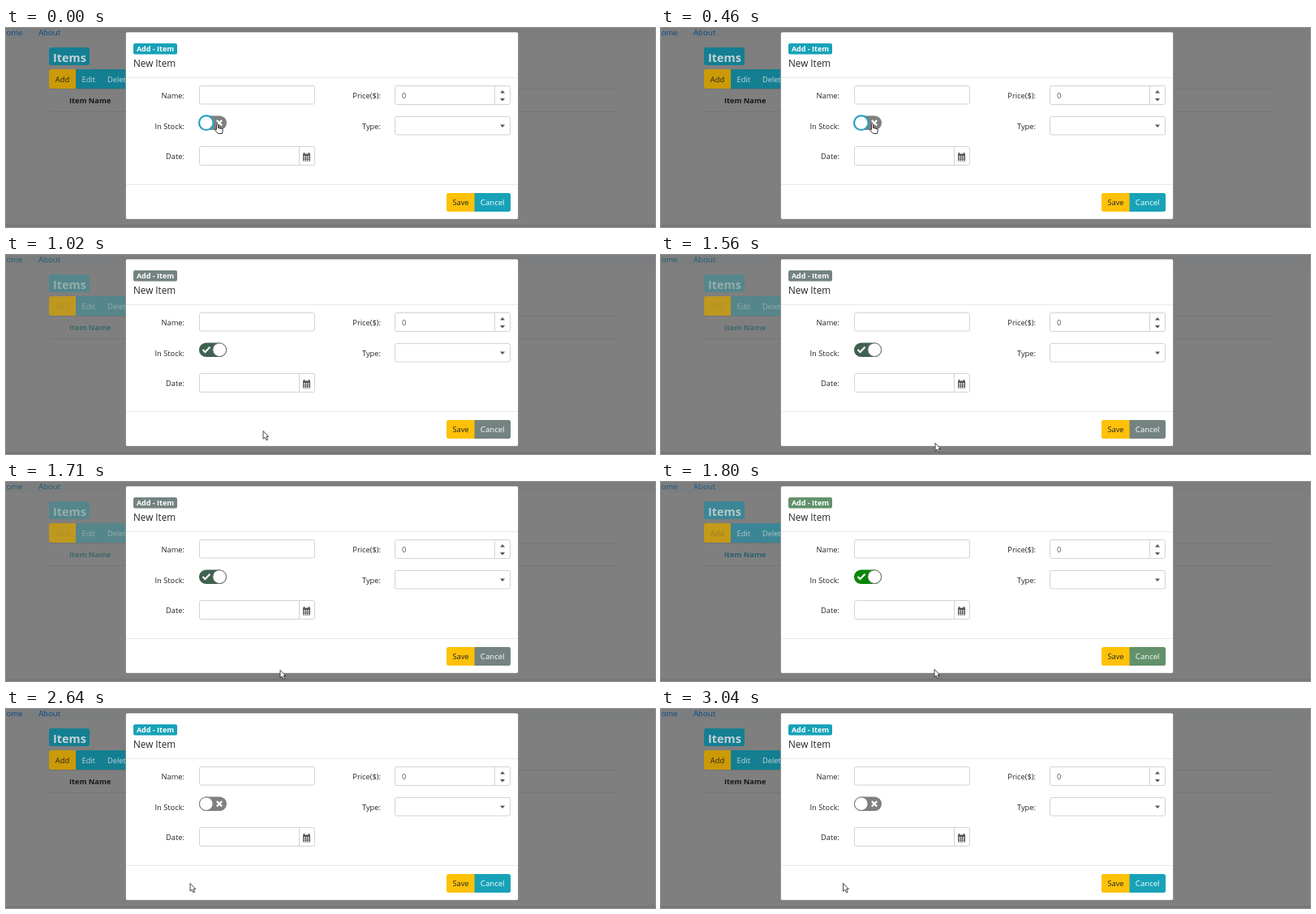
These frames come from a looping animation (800 by 246 pixels, 3250 ms). An HTML page:

```html
<!DOCTYPE html>
<html lang="en">
<head>
<meta charset="utf-8">
<title>Add item dialog</title>
<style>
  html, body { margin: 0; width: 100%; height: 100%; overflow: hidden; background: #7f7f7f; }
  svg { display: block; }
  text { font: 9.3px "Open Sans", "Noto Sans", sans-serif; fill: #212529; }
  .bold { font-weight: 700; }
  .link { font-size: 9.6px; fill: var(--link); }
  .field { fill: #fff; stroke: #ced4da; }
  .line { stroke: #e6e9ec; }
  .dim { stroke: #717476; }
  .icon { fill: #555; }
  .accent { fill: var(--accent); }
  .page { fill: var(--page); }
  .pageText { fill: var(--pageText); }
  .white { fill: #fff; }
  .end { text-anchor: end; }
  .mid { text-anchor: middle; }
</style>
</head>
<body>
<svg id="stage" width="800" height="246" viewBox="0 0 800 246">
  <!-- dimmed page -->
  <rect width="800" height="246" fill="#7f7f7f"/>
  <rect width="800" height="13" fill="#7c7d7e"/>
  <path class="dim" d="M53 75.5H755M53 103.5H755"/>
  <rect y="243" width="800" height="3" fill="#777"/>
  <text class="link end" x="20.5" y="9">Home</text>
  <text class="link" x="40" y="9">About</text>
  <rect class="page" x="53" y="24" width="50" height="22" rx="3"/>
  <text class="bold pageText" x="58" y="41.5" style="font-size:14.4px">Items</text>
  <rect class="page" x="80" y="51" width="80" height="24"/>
  <path d="M86 51H56a3 3 0 0 0-3 3V72a3 3 0 0 0 3 3H86Z" fill="var(--add)"/>
  <text class="mid" x="69.5" y="66.5" style="fill:var(--addText)">Add</text>
  <text class="pageText" x="93.5" y="66.5">Edit</text>
  <text class="pageText" x="125" y="66.5">Delete</text>
  <text class="bold" x="78" y="93" style="font-size:9.2px;fill:var(--head)">Item Name</text>

  <!-- dialog -->
  <rect x="147.5" y="5" width="484" height="231.5" rx="2" fill="#fff" stroke="#666" stroke-opacity=".5"/>
  <path class="line" d="M148 61.5H631M148 193.5H631"/>
  <rect class="accent" x="157" y="19" width="54" height="13.5" rx="2"/>
  <text class="bold white mid" x="184" y="29.3" style="font-size:9px">Add - Item</text>
  <text x="157" y="47.5" style="font-size:11.7px">New Item</text>

  <text class="end" x="220" y="87">Name:</text>
  <text class="end" x="220" y="124.5">In Stock:</text>
  <text class="end" x="220" y="162">Date:</text>
  <text class="end" x="462" y="87">Price($):</text>
  <text class="end" x="462" y="124.5">Type:</text>

  <rect class="field" x="238.5" y="71.5" width="142" height="22.5" rx="2"/>
  <rect class="field" x="238.5" y="146.5" width="142" height="23" rx="2"/>
  <rect class="field" x="479.5" y="71.5" width="142" height="23" rx="2"/>
  <rect class="field" x="479.5" y="109.5" width="142" height="22.5" rx="2"/>
  <path class="field" d="M361.5 147V169M602.5 72V94"/>
  <text x="488" y="87" style="fill:#495057">0</text>
  <path class="icon" d="M609 80.5l3-3.5 3 3.5ZM609 87l3 3.5 3-3.5ZM609 119.500h6l-3 3.500Z"/>
  <path class="icon" d="M366 155.500h9v9h-9Z"/>
  <path d="M367.500 154v2.500M373.500 154v2.500" stroke="#555" stroke-width="1.500"/>
  <path d="M367 159h7M367 161.200h7M367 163.300h7" stroke="#fff" stroke-width="1.300" stroke-dasharray="1.600 1"/>

  <path d="M578 204H545.500a2.500 2.500 0 0 0-2.500 2.500V224.500a2.500 2.500 0 0 0 2.500 2.500H578Z" fill="#ffc107"/>
  <path class="accent" d="M577.500 204H619.500a2.500 2.500 0 0 1 2.500 2.500V224.500a2.500 2.500 0 0 1-2.500 2.500H577.500Z"/>
  <text class="mid" x="560.5" y="219.300">Save</text>
  <text class="white mid" x="599.700" y="219.300" style="font-size:9.6px">Cancel</text>

  <!-- switch -->
  <rect id="track" x="238" y="108.500" width="34" height="17.500" rx="8.750"/>
  <g fill="none" stroke="#fff" stroke-width="2.200">
    <path id="check" d="M242.500 117l3 3 6-6.200"/>
    <path id="cross" d="M259.800 114l6.400 6.400m0-6.400l-6.400 6.400"/>
  </g>
  <circle id="knob" cy="117.200" fill="#fff"/>

  <!-- pointers -->
  <g id="pointer" stroke="#333" fill="#fff" stroke-linejoin="round">
    <path id="arrow" d="M0 0V9.800L2.200 7.700 4 11.500 5.700 10.700 4 7.100H6.800Z" stroke-width=".9"/>
    <path id="hand" d="M-1.500-4.500q1.200-1 2 0V0l4.500 1q1.500.5 1.300 2L5.500 7H.5L-3.500 2.500q0-1.700 2 -.5Z" stroke-width="1"/>
  </g>
</svg>
<script>
const LOOP = 3250;
const $ = id => document.getElementById(id);

const palettes = {
  normal: { accent: "#17a2b8", page: "#147f92", pageText: "#c5d4d7", add: "#cb9a08",
            addText: "#2b2510", head: "#15171a", link: "#0b4a86", on: "#2b8a35" },
  grey:   { accent: "#748381", page: "#55868b", pageText: "#96adab", add: "#bf9820",
            addText: "#b18f27", head: "#3d686a", link: "#1d5f70", on: "#3f6150" },
  green:  { accent: "#62916a", page: "#3b8696", pageText: "#b4c8c9", add: "#c49a18",
            addText: "#9a7d25", head: "#28606a", link: "#1b5a80", on: "#078607" }
};

// time, pointer x, pointer y, switch position, palette
const steps = [
  [0, 261, 123.5, 0, "normal"],
  [780, 271.500, 126, 0, "normal"],
  [860, 283, 150, 0, "normal"],
  [940, 302, 190, .5, "normal"],
  [1020, 317, 217.500, 1, "grey"],
  [1090, 328, 225, 1, "grey"],
  [1170, 335, 230, 1, "grey"],
  [1240, 339, 233, 1, "grey"],
  [1560, 338, 232.500, 1, "grey"],
  [1720, 337.500, 232, 1, "green"],
  [1800, 337, 231.500, 1, "green"],
  [2320, 308, 227, 1, "green"],
  [2400, 274, 219.500, .4, "normal"],
  [2510, 248, 217, .1, "normal"],
  [2580, 234, 216, 0, "normal"],
  [2640, 227, 215.500, 0, "normal"],
  [2870, 224.500, 215.500, 0, "normal"]
];

function set(id, attrs) {
  for (const name in attrs) $(id).setAttribute(name, attrs[name]);
}

function draw(now) {
  const t = now % LOOP;
  const [, x, y, pos, name] = steps.findLast(step => step[0] <= t);
  const colors = palettes[name];
  for (const key in colors) $("stage").style.setProperty("--" + key, colors[key]);

  const moving = pos > 0 && pos < 1;
  const focused = t < 940;
  const hover = t < 780;
  set("track", { fill: moving ? "#568f58" : pos ? colors.on : "#808080" });
  set("check", { opacity: moving ? .4 : pos });
  set("cross", { opacity: moving ? .55 : 1 - pos });
  set("knob", {
    cx: 246.800 + 16.400 * pos,
    r: focused ? 8.800 : 8.300,
    stroke: hover ? "#25a3c4" : focused ? "#58b3de" : moving ? "#fff" : "#707070",
    "stroke-width": focused ? 2.200 : .9
  });
  set("pointer", { transform: `translate(${x} ${y})` });
  set("hand", { visibility: hover ? "visible" : "hidden" });
  set("arrow", { visibility: hover ? "hidden" : "visible" });
  requestAnimationFrame(draw);
}
draw(performance.now());
</script>
</body>
</html>
```
